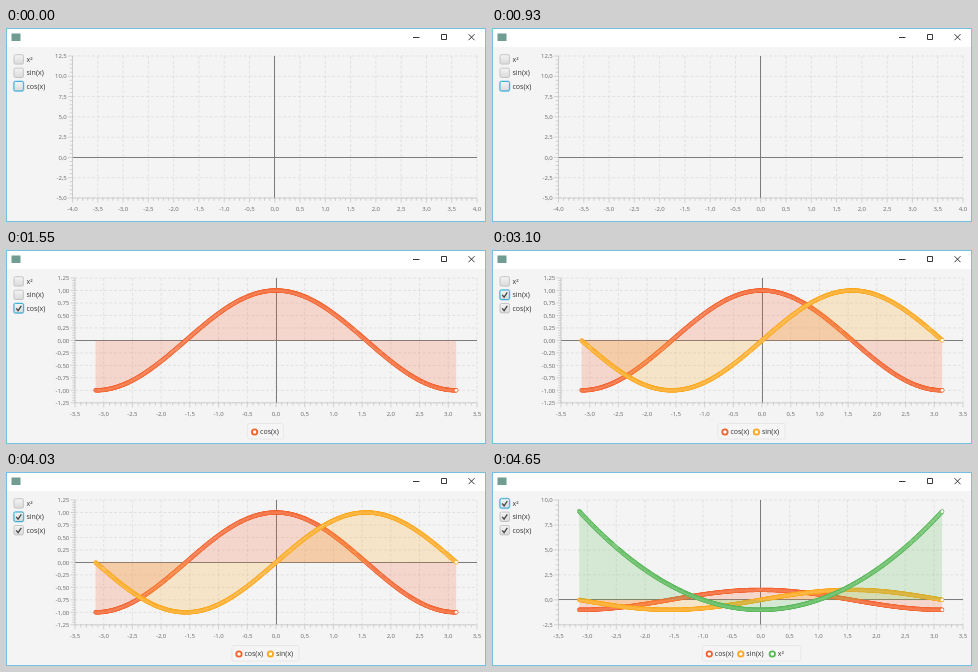
Animation of 480 by 194 pixels, one loop 6.2 s. Source, as an HTML page:

```html
<!DOCTYPE html>
<html lang="en">
<head>
<meta charset="utf-8">
<title>Function plotter</title>
<style>
html, body { margin: 0; width: 100%; height: 100%; overflow: hidden; background: #f4f4f4; }
svg { display: block; width: 480px; height: 194px; }
text { font: 7px "Open Sans", "Noto Sans", sans-serif; fill: #333; }
.tick { font-size: 6px; fill: #666; }
.grid { stroke: #d9d9d9; stroke-width: .7; stroke-dasharray: 2.9 2; }
.axis { stroke: #b9b9b9; stroke-width: .6; }
.zero { stroke: #7c7c7c; stroke-width: 1; }
.icon { fill: none; stroke: #222; stroke-width: .9; }
</style>
</head>
<body>
<svg id="stage" viewBox="0 0 480 194"></svg>
<script>
const series = {
  cos: { label: 'cos(x)', color: '#f3622d', fn: Math.cos },
  sin: { label: 'sin(x)', color: '#fba71b', fn: Math.sin },
  sq: { label: 'x²', color: '#57b757', fn: x => x * x - 1 }
};
const boxes = ['sq', 'sin', 'cos'];
const wide = { left: 69, bottom: 152.8, x: 3.5, lo: -1.25, hi: 1.25, step: .25, digits: 2 };
const scenes = [
  { left: 66.5, bottom: 170, x: 4, lo: -5, hi: 12.5, step: 2.5, digits: 1, focus: 'cos', on: [] },
  { ...wide, focus: 'cos', on: ['cos'] },
  { ...wide, focus: 'sin', on: ['cos', 'sin'] },
  { left: 66.5, bottom: 152.8, x: 3.5, lo: -2.5, hi: 10, step: 2.5, digits: 1, focus: 'sq', on: ['cos', 'sin', 'sq'] }
];
const plotTop = 28, plotRight = 471, hold = 1550;

const line = (x1, y1, x2, y2, cls) =>
  `<path class="${cls}" d="M${x1} ${y1}L${x2} ${y2}"/>`;
const text = (x, y, s, cls = '', anchor = 'start') =>
  `<text x="${x}" y="${y}" class="${cls}" text-anchor="${anchor}">${s}</text>`;
const rect = (x, y, w, h, attrs) =>
  `<rect x="${x}" y="${y}" width="${w}" height="${h}" ${attrs}/>`;
const snap = v => Math.floor(v) + .5;
const decimal = (v, digits) => v.toFixed(digits).replace('.', ',');

function plot(s) {
  const px = x => s.left + (x + s.x) / (2 * s.x) * (plotRight - s.left);
  const py = y => s.bottom - (y - s.lo) / (s.hi - s.lo) * (s.bottom - plotTop);
  let grid = '', axes = '', curves = '';

  const columns = Math.round(s.x * 20);
  for (let i = 0; i <= columns; i++) {
    const v = i / 10 - s.x, x = px(v), major = i % 5 === 0;
    axes += line(x, s.bottom, x, s.bottom + (major ? 4.5 : 2.8), 'axis');
    if (!major) continue;
    grid += line(x, plotTop, x, s.bottom, 'grid');
    axes += text(x, s.bottom + 12.7, decimal(v, 1), 'tick', 'middle');
  }
  const rows = Math.round((s.hi - s.lo) / s.step * 5);
  for (let i = 0; i <= rows; i++) {
    const v = s.lo + i * s.step / 5, y = py(v), major = i % 5 === 0;
    axes += line(s.left - (major ? 4.5 : 2.8), y, s.left, y, 'axis');
    if (!major) continue;
    grid += line(s.left, y, plotRight, y, 'grid');
    axes += text(s.left - 5.7, y + 2.2, decimal(v, s.digits), 'tick', 'end');
  }
  axes += line(s.left, plotTop, s.left, s.bottom, 'axis') + line(s.left, s.bottom, plotRight, s.bottom, 'axis');
  const zeros = line(s.left, snap(py(0)), plotRight, snap(py(0)), 'zero') +
    line(snap(px(0)), plotTop, snap(px(0)), s.bottom, 'zero');

  for (const key of s.on) {
    const { fn, color } = series[key];
    const points = Array.from({ length: 629 }, (_, i) => {
      const x = i / 100 - Math.PI;
      return px(x).toFixed(2) + ' ' + py(fn(x)).toFixed(2);
    }).join('L');
    const mark = `url(#${key})`;
    curves += `<path d="M${px(-Math.PI)} ${py(0)}L${points}V${py(0)}Z" fill="${color}" fill-opacity=".2"/>` +
      `<path d="M${points}" fill="none" stroke="${color}" marker-start="${mark}" marker-mid="${mark}" marker-end="${mark}"/>`;
  }
  return grid + zeros + curves + axes;
}

function legend(keys) {
  if (!keys.length) return '';
  const w = 31.3 * keys.length + 4.5, left = 259.5 - w / 2;
  return rect(left, 173.5, w, 15.5, 'rx="2" fill="#f5f5f5" stroke="#e2e2e2" stroke-width=".7"') +
    keys.map((key, i) => {
      const x = left + 7 + i * 31.5, { color, label } = series[key];
      return `<circle cx="${x}" cy="182" r="2.7" fill="#fff" stroke="${color}" stroke-width="1.8"/>` +
        text(x + 5.5, 184.4, label);
    }).join('');
}

function checkbox(key, i, s) {
  const y = 26.7 + i * 13.4, focus = s.focus === key;
  return (focus ? rect(7.4, y - .6, 10.6, 10.6, 'rx="2" fill="none" stroke="#a9dcef" stroke-width="1"') : '') +
    rect(8, y, 9.4, 9.4, `rx="1.4" fill="url(#face)" stroke="${focus ? '#159fd0' : '#bababa'}" stroke-width=".8"`) +
    (s.on.includes(key) ? `<path d="M10.2 ${y + 4.8}l1.9 2.3 3.2-4.8" fill="none" stroke="#444" stroke-width="1.3"/>` : '') +
    text(20.5, y + 7.3, series[key].label);
}

const markers = Object.entries(series).map(([key, { color }]) =>
  `<marker id="${key}" markerUnits="userSpaceOnUse" markerWidth="6" markerHeight="6" refX="3" refY="3">
    <circle cx="3" cy="3" r="2.2" fill="${color}"/><circle cx="3" cy="3" r="1.5" fill="#fff"/></marker>`).join('');

const stage = document.getElementById('stage');
stage.innerHTML = `<defs>${markers}
  <linearGradient id="face" x2="0" y2="1"><stop stop-color="#f4f4f4"/><stop offset="1" stop-color="#dadada"/></linearGradient></defs>` +
  rect(0, 0, 480, 194, 'fill="#f4f4f4"') + rect(0, 0, 480, 19, 'fill="#fff"') +
  rect(5.5, 5.5, 9, 7.5, 'fill="#719c92"') +
  '<path class="icon" d="M407 9.5h6.5M435.5 6.5h5v5h-5zM462.5 6.2l6 6m0-6l-6 6"/>' +
  scenes.map(s => `<g class="scene">${plot(s)}${legend(s.on)}${boxes.map((key, i) => checkbox(key, i, s)).join('')}</g>`).join('') +
  rect(.5, .5, 479, 193, 'fill="none" stroke="#74bfe2"');

const groups = stage.querySelectorAll('.scene');
const start = performance.now();
function draw() {
  const now = Math.floor((performance.now() - start) / hold) % scenes.length;
  groups.forEach((g, i) => g.style.display = i === now ? '' : 'none');
  requestAnimationFrame(draw);
}
draw();
</script>
</body>
</html>
```
